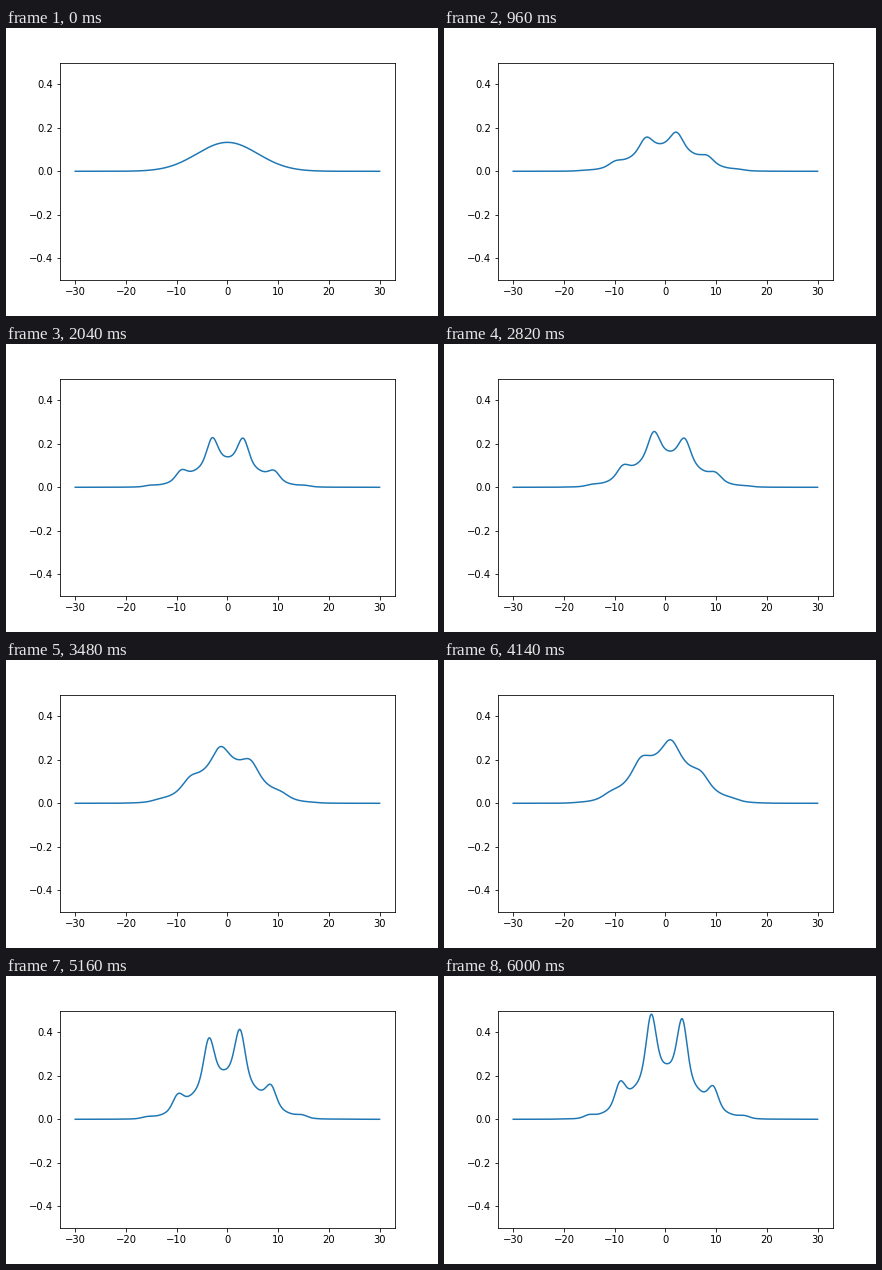
A matplotlib script for the animation above (6.06 s loop, 432x288 px).

```python
import numpy as np
import matplotlib.pyplot as plt
from matplotlib.animation import FuncAnimation

FRAMES = 101
INTERVAL = 60  # ms
DT = 0.1

plt.rcParams["font.family"] = "DejaVu Sans"
plt.rcParams["font.size"] = 10

x = np.linspace(-30, 30, 601)
bump = np.exp(-x**2 / 72) / (3 * np.sqrt(2 * np.pi))


def ripple(t):
    """Complex strength of the ripple: a fixed part plus a turning part."""
    if t == 0:
        return 0
    radius = 0.192 + 0.041 * np.tanh((t - 5.5) / 1.8)
    lag = 0.147 * (1 - np.exp(-2 * t))
    return radius * np.exp(1j * (t - lag)) - 0.149


def profile(t):
    """Growing Gaussian, sharpened into crests by the drifting ripple."""
    w = ripple(t) * np.exp(-1j * x)
    shape = (w + 0.45 * w**2).real - abs(w)**2 / 4
    return bump * np.exp(0.1 * t + shape)


fig, ax = plt.subplots(figsize=(6, 4), dpi=72)
fig.subplots_adjust(left=0.125, right=0.9, bottom=0.125, top=0.88)
line, = ax.plot(x, profile(0), color="#1f77b4", lw=1.5)
ax.set_xlim(-33, 33)
ax.set_ylim(-0.5, 0.5)
ax.set_xticks(range(-30, 31, 10))
ax.set_yticks([-0.4, -0.2, 0, 0.2, 0.4])


def draw(i):
    line.set_ydata(profile(i * DT))
    return line,


anim = FuncAnimation(fig, draw, frames=FRAMES, interval=INTERVAL,
                     init_func=lambda: draw(0), repeat=True, repeat_delay=0)
plt.show()
```
